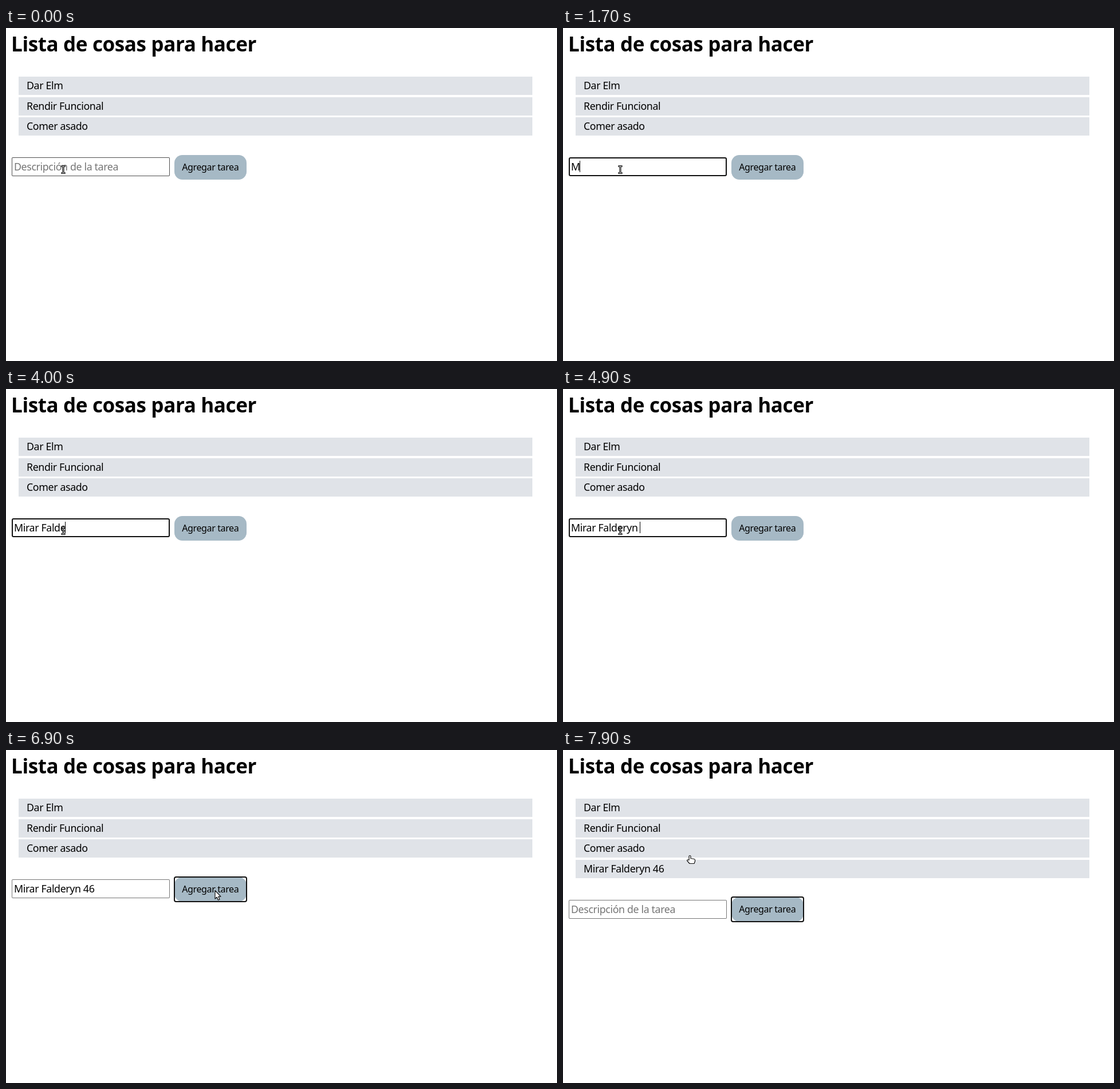
An HTML page for the animation above (8000 ms loop, 962 by 582 pixels).

```html
<!DOCTYPE html>
<html lang="es">
<head>
<meta charset="utf-8">
<title>Lista de cosas para hacer</title>
<style>
  html, body { margin: 0; width: 962px; height: 582px; overflow: hidden; background: #fff; }
  body {
    position: relative;
    font: 17.8px "Noto Sans", "Open Sans", sans-serif;
    letter-spacing: -.0208em;
    white-space: pre;
    color: #000;
  }
  body > *, #form > * { position: absolute; box-sizing: border-box; }
  h1 { left: 9px; top: 0; margin: 0; font-size: 35px; line-height: 55px; }
  .item { left: 22px; width: 897px; height: 32px; padding-left: 14px; line-height: 31px; background: #e0e3e8; }
  #form { left: 0; top: 0; }
  #field {
    left: 10px; top: 226.3px; width: 276px; height: 33px;
    padding: 1px 4px; line-height: 30px; border-radius: 2px;
    box-shadow: inset 0 0 0 1px #767676;
  }
  #field.hover { box-shadow: inset 0 0 0 1px #4f4f4f; }
  #field.focus { box-shadow: inset 0 0 0 2px #101010; border-radius: 3px; }
  #field.empty #text { color: #757575; }
  #caret { position: absolute; top: 6px; width: 1px; height: 20px; margin-left: -1px; background: #000; }
  #button {
    left: 294px; top: 221.6px; width: 125.5px; height: 43px;
    border-radius: 14px; background: #a6b9c5;
    font-size: 16px; line-height: 43px; text-align: center;
  }
  #button.focus::after {
    content: ""; position: absolute; inset: -1px;
    border: 2px solid #101010; border-radius: 4px;
  }
  svg { left: 0; top: 0; width: 962px; height: 582px; }
  #mouse path { fill: #fff; stroke: #111; stroke-width: 1.2; stroke-linejoin: round; }
</style>
</head>
<body><h1>Lista de cosas para hacer</h1><div id="form"><div id="field"><span id="text"></span><span id="caret"></span></div><div id="button">Agregar tarea</div></div><svg><g id="mouse"><path/></g></svg>
<script>
const LOOP = 8000;
const FOCUS = 700, PRESS = 6900, ADDED = 7000;
const ROW = 35.5;
const TASK = "Mirar Falderyn 46";
const HINT = "Descripción de la tarea";
const KEY_TIMES = [1700, 2000, 2100, 2300, 2400, 2600, 3100, 3400, 3600,
  3800, 4000, 4300, 4500, 4700, 4900, 5200, 5400];

const CURSORS = {
  beam: "M-3-7H-.8L0-6.4.8-7H3V-5H1V5H3V7H.8L0 6.4-.8 7H-3V5H-1V-5H-3Z",
  arrow: "M0 0V14.5L3.2 11.6 5.4 16.8 8 15.7 5.8 10.6H10Z",
  hand: "M-2 8V1.5a1.5 1.5 0 0 1 3 0V5L7 6q1.5.4 1.5 2V10L7 14H-1L-5.3 9q-.2-2 1.6-1.5Z"
};

// [start, x, y, cursor]
const MOUSE = [
  [0, 100, 247.5, "beam"],
  [5900, 112, 250, "beam"],
  [6000, 155, 255, "beam"],
  [6100, 196, 255, "beam"],
  [6300, 300, 239, "arrow"],
  [6400, 360, 246, "arrow"],
  [6600, 363, 246, "arrow"],
  [6700, 365, 245.5, "arrow"],
  [7700, 338, 236, "arrow"],
  [7800, 262, 205, "hand"],
  [7900, 222, 184.5, "hand"]
];

const $ = id => document.getElementById(id);
const field = $("field"), mouse = $("mouse");

const items = ["Dar Elm", "Rendir Funcional", "Comer asado", TASK].map((label, i) => {
  const row = document.createElement("div");
  row.className = "item";
  row.textContent = label;
  row.style.top = Math.round(85 + i * ROW) + "px";
  document.body.insertBefore(row, $("form"));
  return row;
});

function caretVisible(t) {
  if (t < FOCUS || t >= PRESS) return false;
  return !(t >= 1300 && t < 1700) && !(t >= 6000 && t < 6600);
}

function render(t) {
  const added = t >= ADDED;
  const focused = t >= FOCUS && t < PRESS;
  const count = added ? 0 : KEY_TIMES.filter(k => k <= t).length;

  items[3].style.display = added ? "" : "none";
  $("form").style.top = (added ? ROW : 0) + "px";
  $("text").textContent = count ? TASK.slice(0, count) : HINT;
  field.classList.toggle("empty", !count);
  field.classList.toggle("hover", t < FOCUS);
  field.classList.toggle("focus", focused);
  $("button").classList.toggle("focus", t >= PRESS);

  // An empty field keeps its caret ahead of the hint.
  const caret = $("caret");
  caret.style.display = caretVisible(t) ? "" : "none";
  caret.style.left = count ? "auto" : "5px";

  const [, x, y, cursor] = MOUSE.filter(step => step[0] <= t).pop();
  mouse.setAttribute("transform", `translate(${x} ${y})`);
  mouse.firstElementChild.setAttribute("d", CURSORS[cursor]);
}

const start = performance.now();
function tick() {
  render((performance.now() - start) % LOOP);
  requestAnimationFrame(tick);
}
tick();
</script>
</body>
</html>
```
